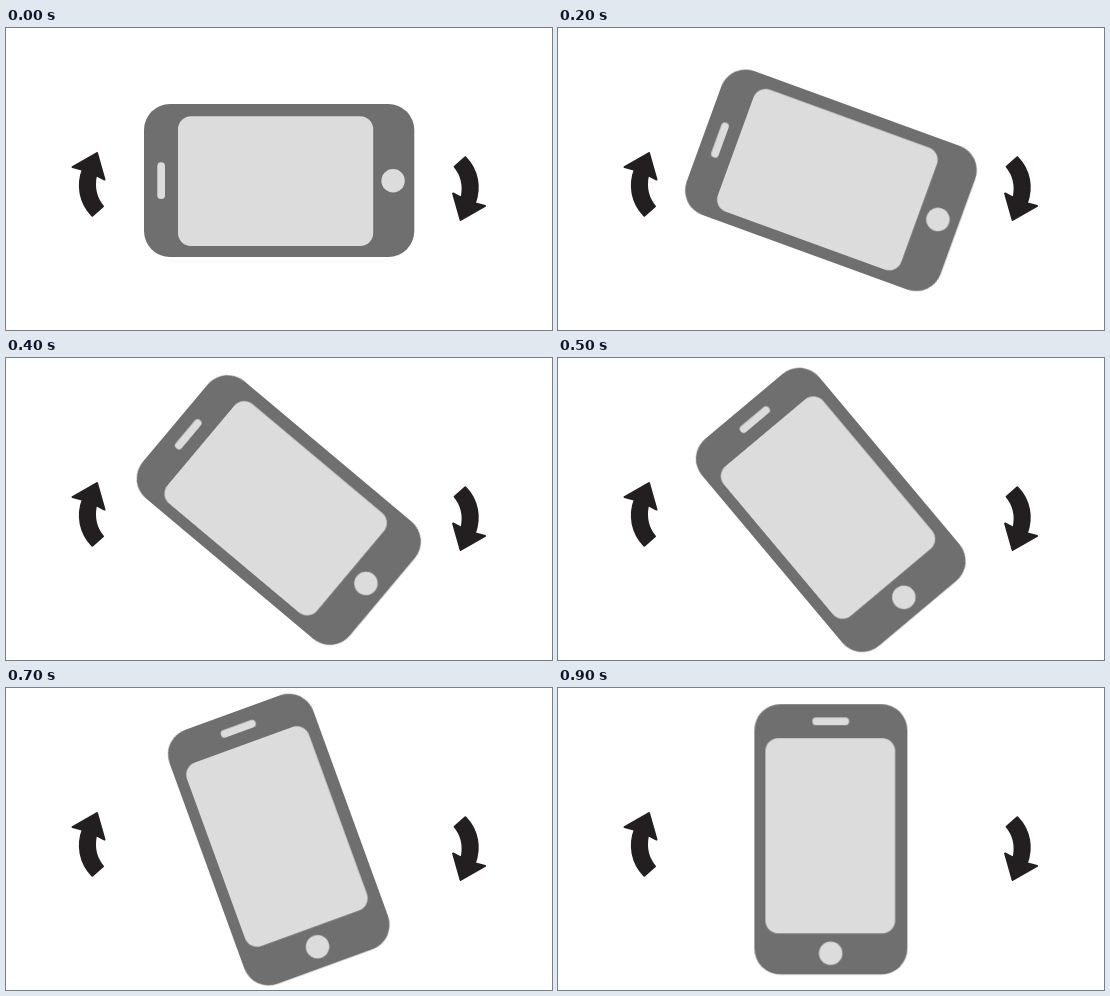
Animation of 546 by 302 pixels, one loop 2900 ms. Source, as an HTML page:

```html
<!DOCTYPE html>
<html lang="en">
<head>
<meta charset="utf-8">
<title>Rotate your phone</title>
<style>
  html, body { margin: 0; width: 100%; height: 100%; overflow: hidden; background: #fff; }
  svg { display: block; width: 546px; height: 302px; }
  .phone {
    fill: #dcdcdc;
    transform-origin: 273.6px 151.8px;
    animation: turn 2900ms infinite;
  }
  .body { fill: #6f6f6f; }
  .arrow { fill: #231f20; stroke: #231f20; stroke-width: 2; stroke-linejoin: round; }

  /* Nine jumps of 10 degrees, 100 ms apart, then a rest upright */
  @keyframes turn {
    0% { transform: rotate(0deg); animation-timing-function: steps(9, end); }
    31.0344%, 100% { transform: rotate(90deg); }
  }
</style>
</head>
<body>
<svg viewBox="0 0 546 302">
  <defs>
    <path id="arrow" class="arrow" d="M91 125 L66.5 139 L76.8 141.7 C71 157 73.5 174.500 86.300 187.700 L97 178.300 C90 170 87.500 159 90 147.200 L98.500 151.500 Z"/>
  </defs>
  <use href="#arrow"/>
  <use href="#arrow" transform="rotate(180 272.800 158.500)"/>
  <g class="phone">
    <rect class="body" x="138" y="76" width="270.300" height="153" rx="26"/>
    <rect x="172" y="88.200" width="195.200" height="129.800" rx="13"/>
    <rect x="151.300" y="134.300" width="7.700" height="36.700" rx="3.850"/>
    <circle cx="387.100" cy="152.700" r="11.700"/>
  </g>
</svg>
</body>
</html>
```
